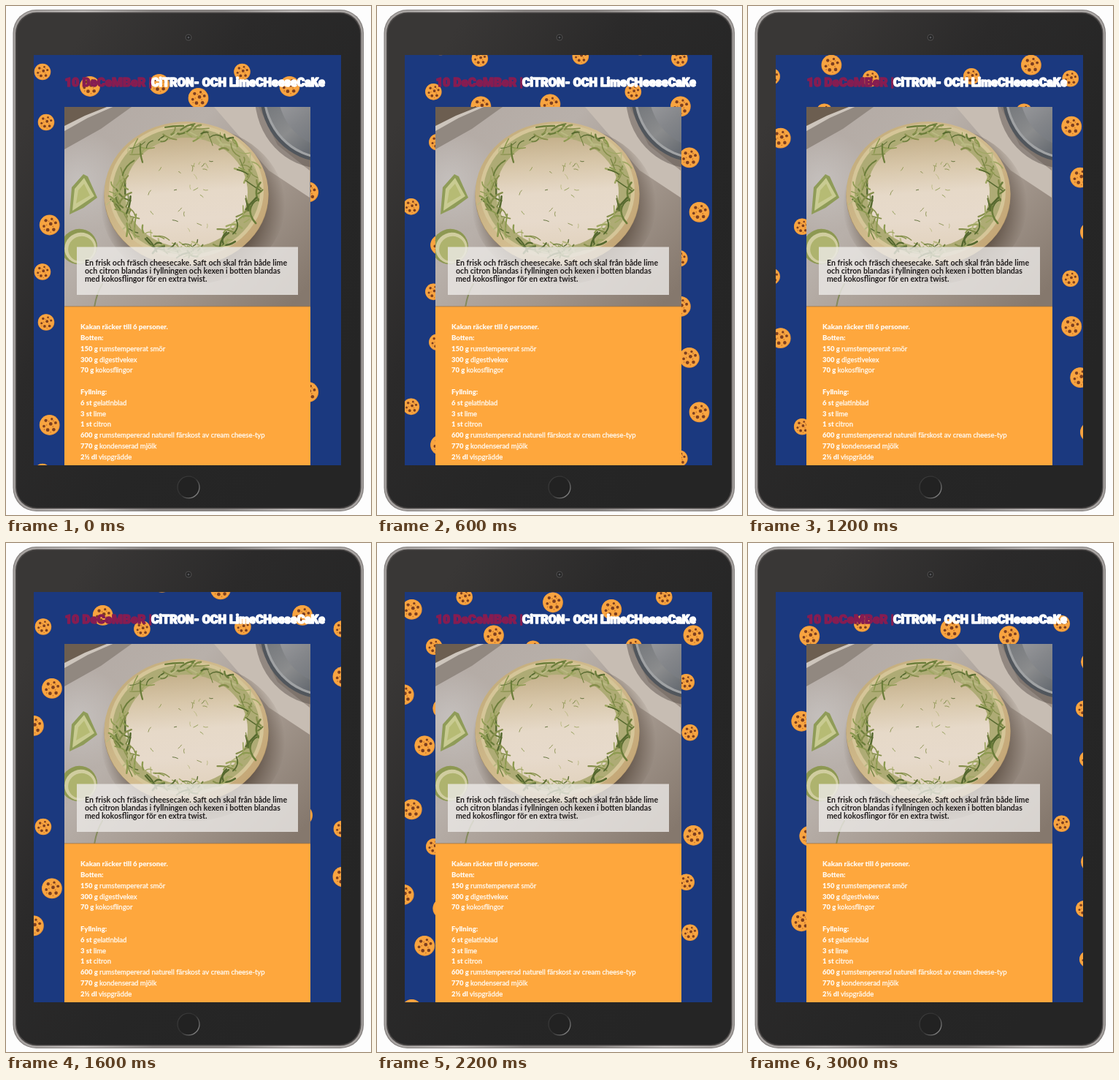
Animation, 500 px wide and 696 px high, one loop 3.1 s. Source, as an HTML page with a canvas:

```html
<!DOCTYPE html>
<html lang="sv">
<head>
<meta charset="utf-8">
<title>Citron- och limecheesecake</title>
<style>
  html, body { margin: 0; width: 100%; height: 100%; overflow: hidden; background: #fdfdfd; }
  canvas { display: block; width: 500px; height: 696px; }
</style>
</head>
<body>
<canvas id="stage"></canvas>
<script>
const W = 500, H = 696, LOOP = 3100, STEP = 100;
const TILE = 273.5, SPEED = TILE / 6000;
const SCREEN = { x: 38, y: 67, w: 421, h: 561 };
const CARD = { x: 80, y: 138, w: 337, h: 273 };
const SMALL = 11.3, LARGE = 13.9;
const COOKIES = [
  [50, 90, SMALL], [55, 159, SMALL], [113.5, 44.5, SMALL], [251.5, 41.5, SMALL], [19.5, 247, SMALL],
  [115, 110, LARGE], [210, 107, LARGE], [263.5, 126, LARGE], [59.7, 26, LARGE],
  [127, 180, LARGE], [140.7, 254.5, LARGE], [221, 264, LARGE], [238.5, 177, LARGE]
];
const RECIPE = [
  ['Kakan räcker till 6 personer.'], ['Botten:'],
  ['150 g', 'rumstempererat smör'], ['300 g', 'digestivekex'], ['70 g', 'kokosflingor'],
  [''], ['Fyllning:'],
  ['6 st', 'gelatinblad'], ['3 st', 'lime'], ['1 st', 'citron'],
  ['600 g', 'rumstempererad naturell färskost av cream cheese-typ'],
  ['770 g', 'kondenserad mjölk'], ['2½ dl', 'vispgrädde']
];
const INTRO = [
  'En frisk och fräsch cheesecake. Saft och skal från både lime',
  'och citron blandas i fyllningen och kexen i botten blandas',
  'med kokosflingor för en extra twist.'
];

const ratio = window.devicePixelRatio || 1;
function prepare(canvas) {
  canvas.width = W * ratio;
  canvas.height = H * ratio;
  const c = canvas.getContext('2d');
  c.scale(ratio, ratio);
  return c;
}
function layer(paint) {
  const canvas = document.createElement('canvas');
  paint(prepare(canvas));
  return canvas;
}
function randomizer(seed) {
  return () => (seed = (seed * 16807) % 2147483647) / 2147483647;
}
function addStops(gradient, colors) {
  colors.forEach((color, i) => gradient.addColorStop(i / (colors.length - 1), color));
  return gradient;
}
function linear(c, x0, y0, x1, y1, ...colors) {
  return addStops(c.createLinearGradient(x0, y0, x1, y1), colors);
}
function radial(c, x, y, r0, r1, ...colors) {
  return addStops(c.createRadialGradient(x, y, r0, x, y, r1), colors);
}
function ellipse(c, x, y, rx, ry, fill, turn = 0) {
  c.beginPath();
  c.ellipse(x, y, rx, ry, turn, 0, 7);
  c.fillStyle = fill;
  c.fill();
}
function polygon(c, fill, ...points) {
  c.beginPath();
  points.forEach(([x, y]) => c.lineTo(x, y));
  c.closePath();
  c.fillStyle = fill;
  c.fill();
}
function roundRect(c, x, y, w, h, r, fill) {
  c.beginPath();
  c.roundRect(x, y, w, h, r);
  c.fillStyle = fill;
  c.fill();
}
function clipRect(c, { x, y, w, h }) {
  c.beginPath();
  c.rect(x, y, w, h);
  c.clip();
}

function paintTablet(c) {
  c.fillStyle = '#fdfdfd';
  c.fillRect(0, 0, W, H);
  roundRect(c, 9.5, 5, 480.5, 686, 32, '#7d7977');
  roundRect(c, 10.5, 6, 478.5, 684, 31, linear(c, 10, 0, 490, 0, '#a29e9c', '#c3bfbd', '#8b8785', '#8b8785', '#c3bfbd', '#a29e9c'));
  roundRect(c, 13, 8.5, 473.5, 679, 29, '#4a4746');
  roundRect(c, 14.5, 10, 470.5, 676, 28, linear(c, 13, 180, 487, 480, '#393736', '#2b2a2a', '#262626', '#252525'));
  ellipse(c, 250, 43, 4.5, 4.5, '#4a4949');
  ellipse(c, 250, 43, 3.2, 3.2, '#232323');
  ellipse(c, 250, 43, 1.5, 1.5, '#55565a');
  ellipse(c, 250, 658, 15.6, 15.6, linear(c, 238, 648, 262, 668, '#3a3a3a', '#303030', '#858585'));
  ellipse(c, 250, 658, 14.3, 14.3, '#222222');
}

function paintLimes(c) {
  polygon(c, '#8f9c58', [87, 285], [90, 248], [106, 230], [112, 233], [125, 262], [106, 276]);
  polygon(c, '#c9cb92', [91, 280], [94, 250], [107, 235], [121, 260]);
  polygon(c, '#b6bb74', [96, 270], [99, 252], [107, 243], [115, 259]);
  ellipse(c, 100, 329, 25, 24, '#8d9852', -0.4);
  ellipse(c, 102, 331, 22, 21, '#d0cd9f', -0.4);
  ellipse(c, 103, 332, 18, 17, '#aeb36e', -0.4);
}

function paintZest(c) {
  const rnd = randomizer(4711);
  const greens = ['#6b7d3a', '#868f4c', '#a0a763', '#56692f', '#b9b982', '#8c9a50'];
  const strand = (x, y, length, turn, bend, width) => {
    const dx = Math.cos(turn) * length, dy = Math.sin(turn) * length;
    c.beginPath();
    c.moveTo(x - dx, y - dy);
    c.quadraticCurveTo(x - dy * bend, y + dx * bend, x + dx, y + dy);
    c.strokeStyle = greens[Math.floor(rnd() * greens.length)];
    c.lineWidth = width;
    c.stroke();
  };
  c.lineCap = 'round';
  for (let i = 0; i < 150; i++) {
    const a = rnd() * Math.PI * 2, k = 0.77 + 0.2 * rnd();
    strand(247 + 106 * k * Math.cos(a), 253 + 92 * k * Math.sin(a),
      4 + 9 * rnd(), a + Math.PI / 2 + (rnd() - 0.5) * 2, (rnd() - 0.5) * 1.6, 1 + 1.7 * rnd());
  }
  for (let i = 0; i < 24; i++) {
    const a = rnd() * Math.PI * 2, k = Math.sqrt(rnd()) * 0.6;
    strand(247 + 106 * k * Math.cos(a), 256 + 86 * k * Math.sin(a),
      1.5 + 2.5 * rnd(), rnd() * 3, rnd() - 0.5, 0.9);
  }
}

function paintPhoto(c) {
  c.save();
  clipRect(c, CARD);
  c.fillStyle = linear(c, 100, 150, 390, 411, '#b3aaa4', '#b8b0aa', '#a3978d', '#85786d');
  c.fillRect(CARD.x, CARD.y, CARD.w, CARD.h);
  ellipse(c, 100, 240, 70, 75, radial(c, 100, 240, 5, 70, 'rgba(205,202,201,.6)', 'rgba(205,202,201,0)'));
  polygon(c, '#c7bdb3', [285, 138], [346, 138], [372, 190], [416, 225], [416, 262], [360, 225]);

  polygon(c, '#918880', [80, 165], [146, 138], [172, 138], [130, 168], [80, 196]);
  polygon(c, '#cdc5bc', [80, 138], [146, 138], [112, 153], [80, 171]);
  polygon(c, '#6c5e50', [80, 138], [138, 138], [108, 150], [80, 164]);

  ellipse(c, 433, 124, 92, 98, 'rgba(80,72,68,.45)');
  ellipse(c, 436, 120, 88, 93, '#51565c');
  ellipse(c, 438, 118, 86, 91, '#a0a2a4');
  ellipse(c, 439, 117, 84, 89, linear(c, 360, 138, 416, 205, '#777a7e', '#8b8c8d', '#62676e'));
  ellipse(c, 444, 113, 72, 80, linear(c, 375, 138, 416, 190, '#96979a', '#84868a', '#74787e'));

  paintLimes(c);
  c.lineCap = 'round';
  c.lineWidth = 2;
  c.strokeStyle = '#848a5c';
  c.beginPath();
  c.moveTo(132, 380);
  c.quadraticCurveTo(124, 393, 121, 412);
  c.stroke();

  ellipse(c, 256, 272, 126, 108, radial(c, 256, 272, 85, 126, 'rgba(75,60,48,.8)', 'rgba(75,60,48,0)'));
  ellipse(c, 247, 260, 112.5, 95, '#a88c63');
  ellipse(c, 247, 257, 112.5, 99, linear(c, 135, 160, 350, 350, '#bfa877', '#d3bd90', '#c0a170'));
  ellipse(c, 247, 253, 106, 92, '#d5c598');
  ellipse(c, 247, 253, 101, 87, '#aeab75');
  ellipse(c, 247, 255, 84, 75, linear(c, 240, 180, 250, 330, '#c5b18c', '#d8c7aa', '#e6d9c8', '#e7dacb', '#e2d3bf'));
  paintZest(c);
  c.restore();
}

function paintCard(c) {
  clipRect(c, SCREEN);
  paintPhoto(c);
  c.fillStyle = 'rgba(237,234,232,.8)';
  c.fillRect(97, 329.5, 303, 65.5);
  c.fillStyle = '#fea73d';
  c.fillRect(CARD.x, 411, CARD.w, 217);
  c.fillStyle = '#a87538';
  c.fillRect(CARD.x, 410.5, CARD.w, 0.8);

  c.fillStyle = '#211d1d';
  c.font = '700 10.6px Lato, sans-serif';
  INTRO.forEach((line, i) => c.fillText(line, 108, 354.8 + i * 11.2));

  c.fillStyle = c.strokeStyle = '#fffaf2';
  c.lineWidth = 0.3;
  RECIPE.forEach(([strong, rest], i) => {
    const y = 442.2 + i * 14.8;
    c.font = '900 9.5px Lato, sans-serif';
    c.fillText(strong, 102, y);
    if (!rest) return;
    const x = 102 + c.measureText(strong + ' ').width;
    c.font = '400 9.5px Lato, sans-serif';
    c.fillText(rest, x, y);
    c.strokeText(rest, x, y);
  });
}

function paintTitle(c) {
  const part = (text, x, size, color) => {
    c.font = `900 ${size}px Roboto, sans-serif`;
    c.fillStyle = c.strokeStyle = color;
    c.fillText(text, x, 110);
    c.strokeText(text, x, 110);
  };
  c.lineJoin = 'round';
  c.lineWidth = 1.6;
  part('10 DeCeMBeR |', 80.5, 17, '#861d52');
  part('CiTRON- OCH LimeCHeeseCaKe', 199, 16.2, '#ffffff');
}

function paintCookie(c, x, y, r) {
  c.save();
  c.translate(x, y);
  c.scale(r / 13.5, r / 13.5);
  ellipse(c, 0, 0, 13.5, 13.5, '#e8953a');
  ellipse(c, -0.3, -0.4, 12.8, 12.8, '#f8a440');
  const chips = [[-5, -6, 2.1], [3, -8, 1.6], [1.5, -1.5, 2.3], [8, -3, 1.9], [-7.5, 1.5, 1.8], [-2.5, 6.5, 2.3], [5.5, 6, 2.2]];
  for (const [cx, cy, cr] of chips) ellipse(c, cx, cy, cr, cr, '#7d3f20');
  const crumbs = [[-1, -5], [5, -5.5], [-4, 0], [4.5, 2], [-7, 6], [1.5, 9.5]];
  for (const [cx, cy] of crumbs) ellipse(c, cx, cy, 0.8, 0.8, '#c06e2a');
  c.restore();
}

const tablet = layer(paintTablet), card = layer(paintCard), title = layer(paintTitle);
const ctx = prepare(document.getElementById('stage'));

function render(time) {
  const shift = time * SPEED;
  ctx.drawImage(tablet, 0, 0, W, H);
  ctx.save();
  clipRect(ctx, SCREEN);
  ctx.fillStyle = '#1b397f';
  ctx.fillRect(SCREEN.x, SCREEN.y, SCREEN.w, SCREEN.h);
  for (const [x, y, r] of COOKIES)
    for (let col = -1; col < 2; col++)
      for (let row = -1; row < 3; row++)
        paintCookie(ctx, x + shift + col * TILE, y + shift + row * TILE, r);
  ctx.restore();
  ctx.drawImage(title, 0, 0, W, H);
  ctx.drawImage(card, 0, 0, W, H);
}

const start = performance.now();
function tick() {
  const time = (performance.now() - start) % LOOP;
  render(Math.floor(time / STEP) * STEP);
  requestAnimationFrame(tick);
}
tick();
</script>
</body>
</html>
```
